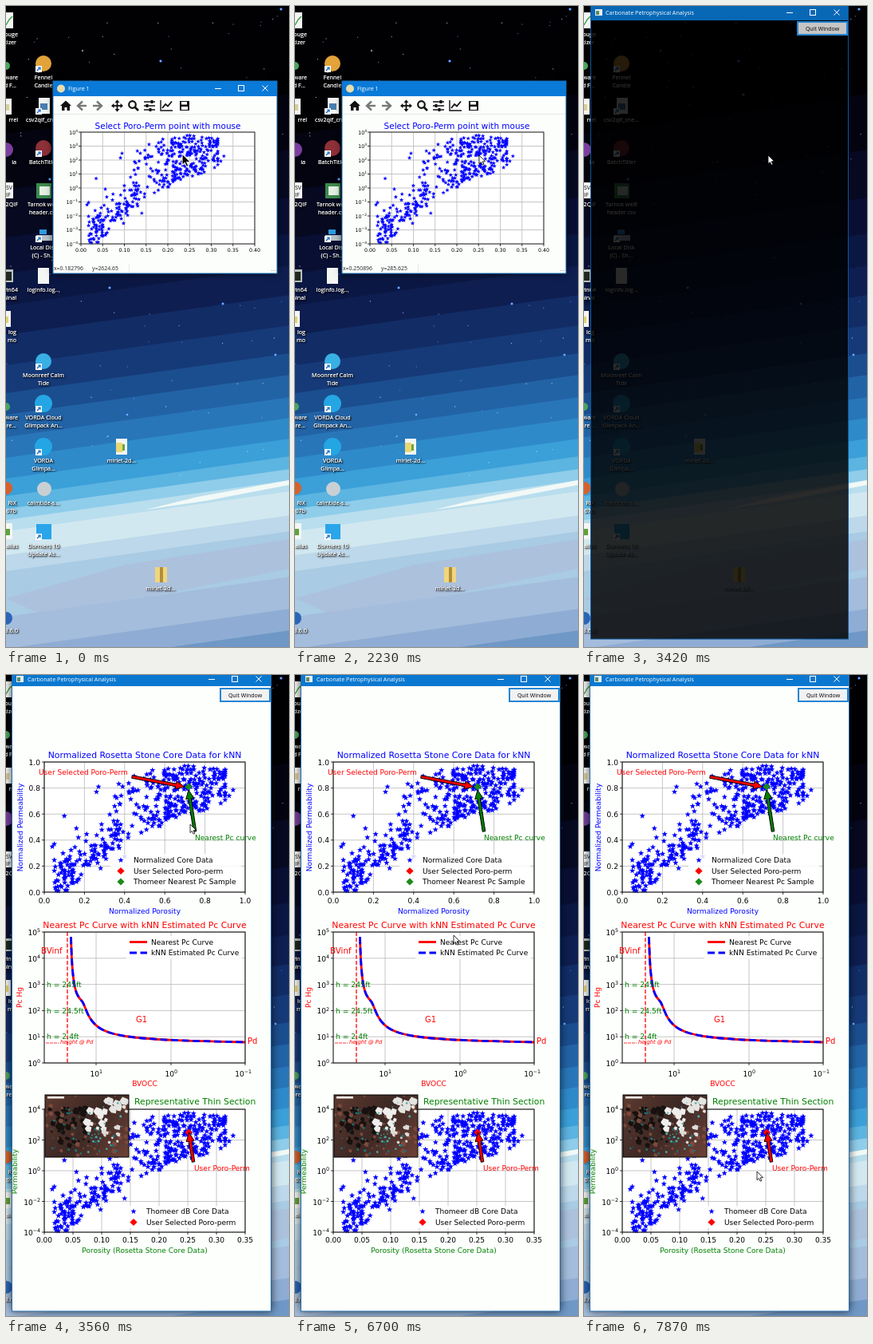
Recreate the animation shown at these times as an HTML page with a canvas. Size 355 px wide and 803 px high, loop 8 s.

```html
<!DOCTYPE html>
<html lang="en">
<head>
<meta charset="utf-8">
<title>Carbonate Petrophysical Analysis</title>
<style>
html, body { margin: 0; width: 355px; height: 803px; overflow: hidden; background: #000 }
canvas { display: block }
</style>
</head>
<body>
<canvas id="stage" width="355" height="803"></canvas>
<script>
const ctx = document.getElementById('stage').getContext('2d');
const LOOP = 8000, UI = '"Open Sans", sans-serif', PLOT = '"DejaVu Sans", sans-serif';
const BLUE = '#00f', RED = '#f00', GREEN = '#008000', GRID = '#b8b8b8';

function seeded(seed) {
  return () => (seed = (seed * 16807) % 2147483647) / 2147483647;
}

// ---------- drawing helpers ----------
function rect(x, y, w, h, fill) {
  ctx.fillStyle = fill;
  ctx.fillRect(x, y, w, h);
}
function frame(x, y, w, h, color, width = 1) {
  ctx.strokeStyle = color;
  ctx.lineWidth = width;
  ctx.strokeRect(x, y, w, h);
}
function disc(x, y, r, fill) {
  ctx.fillStyle = fill;
  ctx.beginPath();
  ctx.arc(x, y, r, 0, 7);
  ctx.fill();
}
function trace(pts) {
  ctx.beginPath();
  pts.forEach(([x, y]) => ctx.lineTo(x, y));
}
function poly(pts, fill, stroke, width = 1) {
  trace(pts);
  ctx.closePath();
  ctx.fillStyle = fill;
  ctx.fill();
  if (stroke) {
    ctx.strokeStyle = stroke;
    ctx.lineWidth = width;
    ctx.stroke();
  }
}
function line(pts, color, width = 1, dash = []) {
  trace(pts);
  ctx.strokeStyle = color;
  ctx.lineWidth = width;
  ctx.setLineDash(dash);
  ctx.stroke();
  ctx.setLineDash([]);
}
function text(s, x, y, size, color = '#000', align = 'left', font = PLOT) {
  ctx.font = size + 'px ' + font;
  ctx.fillStyle = color;
  ctx.textAlign = align;
  ctx.fillText(s, x, y);
}
function vertical(s, x, y, color) {
  ctx.save();
  ctx.translate(x, y);
  ctx.rotate(-Math.PI / 2);
  text(s, 0, 0, 9.05, color, 'center');
  ctx.restore();
}
function power(exp, x, y, size) {
  const sup = String(exp).replace('-', '\u2212');
  ctx.font = size * .7 + 'px ' + PLOT;
  const w = ctx.measureText(sup).width;
  text(sup, x, y - size * .4, size * .7, '#000', 'right');
  text('10', x - w, y, size, '#000', 'right');
}
function star(x, y, r) {
  const pts = [];
  for (let i = 0; i < 10; i++) {
    const a = i * Math.PI / 5, d = i % 2 ? r * .42 : r;
    pts.push([x + d * Math.sin(a), y - d * Math.cos(a)]);
  }
  poly(pts, BLUE);
}
function diamond(x, y, fill, r = 4.6) {
  poly([[x, y - r], [x + r, y], [x, y + r], [x - r, y]], fill);
}
function arrow(x0, y0, x1, y1, fill) {
  const len = Math.hypot(x1 - x0, y1 - y0);
  ctx.save();
  ctx.translate(x0, y0);
  ctx.rotate(Math.atan2(y1 - y0, x1 - x0));
  poly([[0, -1.8], [len - 11, -1.8], [len - 11, -5], [len, 0], [len - 11, 5], [len - 11, 1.8], [0, 1.8]], fill, '#000', .9);
  ctx.restore();
}
function captionButtons(min, max, close, y) {
  line([[min - 4, y + .5], [min + 4, y + .5]], '#fff');
  frame(max - 3.5, y - 3.5, 7, 7, '#fff');
  line([[close - 3.5, y - 3.5], [close + 3.5, y + 3.5]], '#fff');
  line([[close - 3.5, y + 3.5], [close + 3.5, y - 3.5]], '#fff');
}

// ---------- core data, in unit coordinates ----------
const samples = (() => {
  const rnd = seeded(4711), bell = () => rnd() + rnd() + rnd() - 1.5;
  const pts = [[.04, .35], [.1, .585], [.05, .37], [.07, .01], [.26, .77], [.27, .81], [.94, .785], [.92, .74], [.16, .49], [.17, .42]];
  for (let i = 0; i < 125; i++) {
    const u = .05 + .35 * Math.pow(rnd(), 1.3);
    pts.push([u, Math.max(.015, .1 + 1.08 * (u - .05) + .17 * bell())]);
  }
  for (let i = 0; i < 285; i++) {
    const u = Math.min(.9, Math.max(.33 + .06 * rnd(), .65 + .3 * bell()));
    const low = .17 + .58 * u, high = .97 - .88 * (u - .72) ** 2;
    pts.push([u, low + (high - low) * rnd()]);
  }
  return pts;
})();
function scatter(x, y, w, h, r) {
  for (const [u, v] of samples) star(x + u * w, y + h - v * h, r);
}

// Grid, ticks and labels; label callbacks get the tick index.
function axes(x, y, w, h, xs, ys, xLabel, yLabel) {
  rect(x, y, w, h, '#fff');
  for (const p of xs) line([[p, y], [p, y + h]], GRID, .8);
  for (const p of ys) line([[x, p], [x + w, p]], GRID, .8);
  xs.forEach((p, i) => { line([[p, y + h], [p, y + h + 3]], '#000', .8); xLabel(i, p); });
  ys.forEach((p, i) => { line([[x - 3, p], [x, p]], '#000', .8); yLabel(i, p); });
}
const ticks = (start, step, n) => Array.from({ length: n }, (_, i) => start + i * step);

// ---------- desktop ----------
// Flat bands: top edge at the left side of the stage, colour.
const bands = [[0, '#010104'], [160, '#03040f'], [230, '#060920'], [290, '#090f33'], [335, '#0b1743'], [375, '#0e1e50'],
  [412, '#122c66'], [450, '#163a78'], [485, '#1b4e8e'], [512, '#2263a6'], [540, '#2876b8'], [566, '#2f8aca'], [592, '#3b9fd8'],
  [614, '#5cb4e0'], [630, '#8fcdea'], [644, '#b9deee'], [658, '#d2e8f0'], [688, '#bcd8ea'], [708, '#a9cbe4'], [765, '#a4bddc'],
  [805, '#8fadd4'], [832, '#6f98c6']];

const labels = [
  [47, 92, 'Fennel', 'Candle'], [47, 145, 'csv2qif_cne...'], [47, 198, 'BatchTitler'],
  [47, 251, 'Tarnok welll', 'header.csv'], [47, 305, 'Local Disk', '(C) - Sh...'], [47, 358, 'loginfo.log...'],
  [47, 465, 'Moonreef Calm', 'Tide'], [47, 518, 'VORDA Cloud', 'Glimpack An...'], [47, 572, 'VORDA', 'Glimpa...'],
  [47, 625, 'calmtide-s...'], [47, 679, 'Dormers 10', 'Update As...'], [145, 572, 'mirlet-2d...'], [194, 732, 'mirlet-2d...']];
const cutLabels = [[38, 'ouge', 'tizer'], [92, 'ware', 'd F...'], [145, 'rrel'], [198, 'ia'], [251, '2QIF'], [358, 'win64', 'minal'],
  [411, 'log', 'mo'], [518, 'ware', 're...'], [625, 'RIX', '07b'], [679, 'alias'], [785, '3.6.0']];

function page(x, y, accent) {
  rect(x - 7, y - 10, 14, 20, '#f4f6f4');
  if (accent) rect(x - 5, y - 3, 9, 8, accent);
}
function shortcut(x, y) {
  rect(x - 10, y + 3, 8, 8, '#fff');
  line([[x - 8, y + 9], [x - 4, y + 5]], '#1769c0', 1.4);
  line([[x - 7, y + 5], [x - 4, y + 5], [x - 4, y + 8]], '#1769c0', 1.2);
}
function icons() {
  disc(47, 72, 10, '#e2a33a');
  page(48, 125, '#4a7fb0');
  disc(47, 178, 10, '#8e3038');
  rect(38, 222, 19, 19, '#3b8a4d');
  rect(42, 226, 13, 11, '#e5f0e4');
  rect(38, 287, 20, 7, '#b9c2c9');
  rect(42, 280, 9, 6, '#2f9be0');
  page(47, 338);
  disc(47, 445, 10, '#38b0e4');
  disc(47, 498, 11, '#25a6e4');
  disc(47, 552, 11, '#25a6e4');
  disc(48, 605, 9, '#c9d0d4');
  rect(38, 649, 19, 19, '#2aa4ea');
  [72, 125, 178, 285, 445, 498, 552, 658].forEach(y => shortcut(47, y));
  page(145, 552, '#66a83c');
  rect(138, 547, 8, 12, '#ead774');
  rect(187, 703, 15, 19, '#f0d67c');
  rect(193, 703, 4, 19, '#b08e3c');
  // icons cut by the left edge
  page(2, 18);
  line([[0, 24], [4, 17], [8, 13]], '#2c9b3c', 1.3);
  disc(0, 75, 5, '#4aa65c');
  page(0, 126, '#d9cf9a');
  disc(0, 180, 9, '#7a3fa0');
  page(2, 231);
  text('SV', 0, 230, 7, '#000', 'left', UI);
  text('IF', 0, 239, 7, '#000', 'left', UI);
  rect(0, 330, 9, 16, '#b8c0bc');
  rect(0, 333, 7, 11, '#202820');
  page(-1, 392, '#e3d36a');
  disc(0, 502, 5, '#4aa65c');
  disc(0, 604, 8, '#d8602a');
  page(1, 658, '#5ea33a');
  disc(0, 767, 8, '#2a66b8');
}
function label(s, x, y, align) {
  // the second pass deepens the shadow
  for (let i = 0; i < 2; i++) text(s, x, y, 7.2, '#fff', align, UI);
}
function desktop() {
  ctx.save();
  ctx.transform(1, -.14, 0, 1, 0, 0);
  for (const [y, color] of bands) rect(0, y, 355, 870 - y, color);
  ctx.restore();
  poly([[0, 742], [150, 700], [355, 668], [355, 705], [190, 738], [40, 760]], 'rgba(176,184,214,.5)');
  poly([[175, 631], [240, 615], [355, 594], [355, 600], [250, 620]], '#f2f9f6');
  const rnd = seeded(97);
  for (let i = 0; i < 105; i++) {
    const x = rnd() * 355, y = rnd() * 590, b = 90 + 150 * rnd();
    rect(x, y, 1.1, 1.1, `rgba(${b},${b + 10},255,.8)`);
  }
  for (const [x, y] of [[194, 69], [200, 111], [345, 4], [55, 217], [130, 353], [272, 373], [338, 437], [152, 512]]) {
    disc(x, y, 1.8, '#2f6ee0');
    disc(x, y, .8, '#e8f2ff');
  }
  disc(167, 195, 1, '#a8404c');
  disc(96, 56, 1.2, '#8c8478');
  icons();
  ctx.save();
  ctx.shadowColor = '#000';
  ctx.shadowBlur = 2;
  ctx.shadowOffsetX = ctx.shadowOffsetY = 1;
  for (const [x, y, ...rows] of labels) rows.forEach((s, i) => label(s, x, y + i * 9.7, 'center'));
  for (const [y, ...rows] of cutLabels) rows.forEach((s, i) => label(s, i || s.length < 4 ? 13 : 15, y + i * 9.7, 'right'));
  ctx.restore();
}

// ---------- first window ----------
function toolbar() {
  const c = '#111';
  poly([[68, 125], [75, 118.5], [82, 125], [80, 125], [80, 131], [76.5, 131], [76.5, 127], [73.5, 127], [73.5, 131], [70, 131], [70, 125]], c);
  for (const [x, d] of [[95, 1], [115, -1]]) {
    line([[x + 6 * d, 125], [x - 4 * d, 125]], '#777', 2.4);
    line([[x + d, 119.5], [x - 5 * d, 125], [x + d, 130.5]], '#777', 2.4);
  }
  line([[133, 125], [146, 125]], c, 1.8);
  line([[139.5, 118.5], [139.5, 131.5]], c, 1.8);
  for (let i = 0; i < 4; i++) {
    ctx.save();
    ctx.translate(139.5, 125);
    ctx.rotate(i * Math.PI / 2);
    poly([[0, -7.5], [3, -4], [-3, -4]], c);
    ctx.restore();
  }
  ctx.strokeStyle = c;
  ctx.lineWidth = 2.2;
  ctx.beginPath();
  ctx.arc(158.5, 123.5, 4.3, 0, 7);
  ctx.stroke();
  line([[161.5, 126.5], [166, 131]], c, 2.6);
  [[120, 183], [125, 177], [130, 181]].forEach(([y, x]) => {
    line([[173, y], [187, y]], c, 1.5);
    rect(x - 1.5, y - 2, 3, 4, c);
  });
  line([[194, 118], [194, 131], [209, 131]], c, 1.4);
  line([[196, 128], [200, 123], [203, 125.5], [208, 119.5]], c, 1.8);
  rect(218, 119, 12, 12, c);
  rect(220, 120, 7, 3.5, '#fff');
  rect(220, 126, 8, 4, '#fff');
}
function pickerWindow(clicked, closing) {
  ctx.save();
  ctx.shadowColor = 'rgba(0,0,0,.7)';
  ctx.shadowBlur = 9;
  rect(59, 94, 281, 241, '#fcfefc');
  ctx.restore();
  rect(59, 94, 281, 19, '#0a7ad8');
  frame(59, 94, 281, 241, '#1a70b8');
  disc(69, 103.5, 5, '#e8dcae');
  text('Figure 1', 78, 106, 7.2, '#fff', 'left', UI);
  if (!closing) captionButtons(266, 295, 325, 103);
  toolbar();
  rect(60, 135, 279, 1, '#e6e8e6');
  text('Select Poro-Perm point with mouse', 203, 153.5, 10.46, BLUE, 'center');
  axes(94, 158, 218, 140, ticks(94, 27.25, 9), ticks(158, 17.5, 9),
    (i, x) => text((i * .05).toFixed(2), x, 308, 6.3, '#000', 'center'),
    (i, y) => power(4 - i, 90, y + 2.5, 6.3));
  scatter(94, 158, 218 * .875, 140, 2.8);
  frame(94, 158, 218, 140, '#000', .8);
  text(clicked ? 'x=0.250896' : 'x=0.182796', 60, 331, 6.9, '#222', 'left', UI);
  text(clicked ? 'y=285.625' : 'y=2624.65', 108, 331, 6.9, '#222', 'left', UI);
  rect(154, 323, .7, 11, '#ddd');
  for (let i = 0; i < 3; i++) rect(337 - i * 2, 331, 1, 1, '#aaa');
}

// ---------- second window ----------
function titleBar(x, w, h, y, color) {
  rect(x, 0, w, h, color);
  rect(x + 6, y - 4, 9, 8, '#e8ecee');
  rect(x + 7, y - 2, 4, 5, '#5a8a68');
  text('Carbonate Petrophysical Analysis', 27, y + 3, 7.2, '#fff', 'left', UI);
  captionButtons(258, 287, 317, y);
}
function quitButton(x, y, fill) {
  rect(x, y, 62, 16, fill);
  frame(x, y, 62, 16, '#2486d4', 2);
  text('Quit Window', x + 31, y + 11, 7, '#000', 'center', UI);
}
function openingWindow() {
  rect(8, 0, 324, 793, 'rgba(0,0,0,.83)');
  titleBar(8, 324, 18, 8, '#0868b6');
  frame(8.5, -2, 323, 795, '#0d5596');
  quitButton(268, 20, '#c6c6c6');
}

function normalizedPlot() {
  text('Normalized Rosetta Stone Core Data for kNN', 174, 104, 10.84, BLUE, 'center');
  axes(48, 109, 252, 163, ticks(48, 50.4, 6), ticks(272, -32.6, 6),
    (i, x) => text((i * .2).toFixed(1), x, 286, 9.05, '#000', 'center'),
    (i, y) => text((i * .2).toFixed(1), 43, y + 3.5, 9.05, '#000', 'right'));
  scatter(48, 109, 252, 163, 3.8);
  frame(48, 109, 252, 163, '#000');
  text('Normalized Porosity', 174, 299, 9.05, BLUE, 'center');
  vertical('Normalized Permeability', 21, 191, BLUE);
  diamond(229, 140, '#1b8a1b');
  arrow(158, 127.5, 224, 140, RED);
  arrow(237, 196, 229, 144, GREEN);
  text('User Selected Poro-Perm', 41, 125, 9.05, RED);
  text('Nearest Pc curve', 237, 207, 9.05, GREEN);
  rect(131, 224, 164, 44, 'rgba(255,255,255,.85)');
  star(144, 232, 3.8);
  diamond(144, 245.5, RED);
  diamond(144, 259, '#1b8a1b');
  ['Normalized Core Data', 'User Selected Poro-perm', 'Thomeer Nearest Pc Sample'].forEach((s, i) => text(s, 160, 235 + i * 13.6, 9.05));
}

const curve = [[81.5, 328], [82, 345], [83, 365], [85, 385], [88, 398], [92, 405], [96, 409], [99, 416], [103, 426], [108, 434],
  [115, 441], [125, 446.5], [140, 451], [160, 454], [190, 456.5], [230, 458.3], [300, 460]];
function smooth(pts) {
  ctx.beginPath();
  ctx.moveTo(...pts[0]);
  for (let i = 1; i < pts.length - 1; i++) {
    const [x, y] = pts[i], [nx, ny] = pts[i + 1];
    ctx.quadraticCurveTo(x, y, (x + nx) / 2, (y + ny) / 2);
  }
  ctx.lineTo(...pts[pts.length - 1]);
}
function pressurePlot() {
  text('Nearest Pc Curve with kNN Estimated Pc Curve', 174, 317, 10.84, RED, 'center');
  axes(48, 322, 252, 164, [113, 207, 300], ticks(486, -32.8, 6),
    (i, x) => power(1 - i, x + 8, 503, 9.05),
    (i, y) => power(i, 43, y + 4, 9.05));
  line([[77, 322], [77, 486]], RED, 1.3, [5, 2.2]);
  ctx.lineWidth = 2.8;
  ctx.strokeStyle = RED;
  smooth(curve);
  ctx.stroke();
  ctx.strokeStyle = BLUE;
  ctx.setLineDash([9, 4.5]);
  ctx.stroke();
  ctx.setLineDash([]);
  frame(48, 322, 252, 164, '#000');
  text('BVinf', 44, 349, 10.3, RED);
  text('G1', 163, 435, 10, RED);
  text('Pd', 303, 462, 10, RED);
  ['h = 245ft', 'h = 24.5ft', 'h = 2.4ft'].forEach((s, i) => text(s, 51, 391 + i * 32.6, 9.2, GREEN));
  line([[50, 461], [66, 461]], RED, .8, [4, 1]);
  ctx.font = 'italic 6.8px ' + PLOT;
  ctx.fillStyle = RED;
  ctx.fillText('height @ Pd', 68, 462);
  text('BVOCC', 174, 515, 9.05, RED, 'center');
  vertical('Pc Hg', 20, 404, RED);
  rect(151, 327, 145, 29, 'rgba(255,255,255,.85)');
  line([[155, 334.5], [177, 334.5]], RED, 2.8);
  line([[155, 348], [177, 348]], BLUE, 2.8, [9, 4.5]);
  text('Nearest Pc Curve', 182, 337.5, 9.05);
  text('kNN Estimated Pc Curve', 182, 351, 9.05);
}

function thinSection() {
  const rnd = seeded(31);
  ctx.save();
  ctx.beginPath();
  ctx.rect(49, 526, 105, 78);
  ctx.clip();
  const tone = ctx.createLinearGradient(49, 526, 154, 604);
  tone.addColorStop(0, '#5e3a30');
  tone.addColorStop(.5, '#3c2824');
  tone.addColorStop(1, '#6e4238');
  rect(49, 526, 105, 78, tone);
  const blobs = (n, x, y, w, h, r, color) => {
    for (let i = 0; i < n; i++) {
      const cx = x + rnd() * w, cy = y + rnd() * h, d = r * (.4 + rnd());
      poly([[cx - d, cy], [cx - d * .3, cy - d], [cx + d, cy - d * .5], [cx + d * .7, cy + d], [cx - d * .4, cy + d * .8]], color);
    }
  };
  blobs(45, 55, 540, 50, 50, 3.5, '#17110f');
  blobs(40, 49, 526, 105, 78, 2.5, '#7c4a3c');
  blobs(50, 55, 540, 90, 60, 1.3, '#1d7478');
  blobs(18, 100, 545, 26, 28, 4, '#f0eeec');
  blobs(14, 126, 530, 26, 22, 4, '#e4e4e0');
  blobs(12, 116, 566, 26, 20, 3, '#dfdcd8');
  blobs(20, 100, 532, 52, 66, 1.2, '#48b0b4');
  rect(52, 528, 21, 2.5, '#fff');
  ctx.restore();
  frame(49, 526, 105, 78, '#000');
}
function sectionPlot() {
  text('Representative Thin Section', 161, 538, 10.84, GREEN);
  axes(48, 544, 252, 154, ticks(48, 36, 8), ticks(544, 38.5, 5),
    (i, x) => text((i * .05).toFixed(2), x, 711, 9.05, '#000', 'center'),
    (i, y) => power(4 - i * 2, 43, y + 4, 9.05));
  scatter(48, 544, 252, 154, 3.8);
  frame(48, 544, 252, 154, '#000');
  thinSection();
  vertical('Permeability', 14, 622, GREEN);
  text('Porosity (Rosetta Stone Core Data)', 174, 724, 9.05, GREEN, 'center');
  diamond(229, 573, RED);
  arrow(235, 610, 229.5, 573, RED);
  text('User Poro-Perm', 236, 621, 9.05, RED);
  rect(148, 665, 147, 28, 'rgba(255,255,255,.85)');
  star(160, 672, 3.8);
  diamond(160, 685.5, RED);
  text('Thomeer dB Core Data', 176, 675, 9.05);
  text('User Selected Poro-perm', 176, 688.5, 9.05);
}
function reportWindow() {
  ctx.save();
  ctx.shadowColor = 'rgba(0,0,0,.7)';
  ctx.shadowBlur = 10;
  rect(7, -10, 326, 807, '#fdfffd');
  ctx.restore();
  titleBar(7, 326, 14, 5, '#0a78d0');
  frame(7.5, -2, 325, 799, '#2a6ea8');
  quitButton(269, 17, '#f2f2f2');
  normalizedPlot();
  pressurePlot();
  sectionPlot();
}

// ---------- pointer: stepped moves along quadratic curves ----------
const moves = [
  { from: 140, to: 290, n: 2, path: [221, 185, 227, 186, 232, 189] },
  { from: 590, to: 1190, n: 5, path: [232, 189, 217, 168, 231, 187] },
  { from: 5060, to: 5360, n: 3, path: [231, 187, 222, 168, 208, 144] },
  { from: 5660, to: 6700, n: 8, path: [208, 144, 236, 200, 199, 326] },
  { from: 6840, to: 7870, n: 8, path: [199, 326, 149, 474, 217, 622] }];

function pointerAt(t) {
  let pos = [221, 185];
  for (const { from, to, n, path: [x0, y0, x1, y1, x2, y2] } of moves) {
    if (t < from) break;
    const step = Math.min(n, 1 + Math.floor((t - from) / (to - from) * (n - 1) + 1e-6));
    let p = step / n;
    p = p * p * (3 - 2 * p);
    const q = 1 - p, mix = (a, b, c) => q * q * a + 2 * q * p * b + p * p * c;
    pos = [mix(x0, x1, x2), mix(y0, y1, y2)];
  }
  return pos;
}
function pointer(t) {
  const [x, y] = pointerAt(t), dark = t < 140;
  ctx.save();
  ctx.translate(x, y);
  if (dark) ctx.scale(1.35, 1.35);
  poly([[0, 0], [0, 10.6], [2.4, 8.4], [4.1, 12.2], [5.9, 11.4], [4.2, 7.8], [7.6, 7.6]], dark ? '#000' : '#fff', dark ? '#fff' : '#000', .8);
  ctx.restore();
}

function draw(t) {
  ctx.clearRect(0, 0, 355, 803);
  desktop();
  if (t < 2380) pickerWindow(t >= 1930, t >= 2230);
  else if (t < 2520) {
    ctx.save();
    ctx.globalAlpha = .3;
    ctx.translate(199.5, 214.5);
    ctx.scale(.94, .94);
    ctx.translate(-199.5, -214.5);
    pickerWindow(true, true);
    ctx.restore();
  } else if (t >= 3560) reportWindow();
  else if (t >= 3420) openingWindow();
  pointer(t);
}

const start = performance.now();
function tick() {
  draw((performance.now() - start) % LOOP);
  requestAnimationFrame(tick);
}
tick();
</script>
</body>
</html>
```
